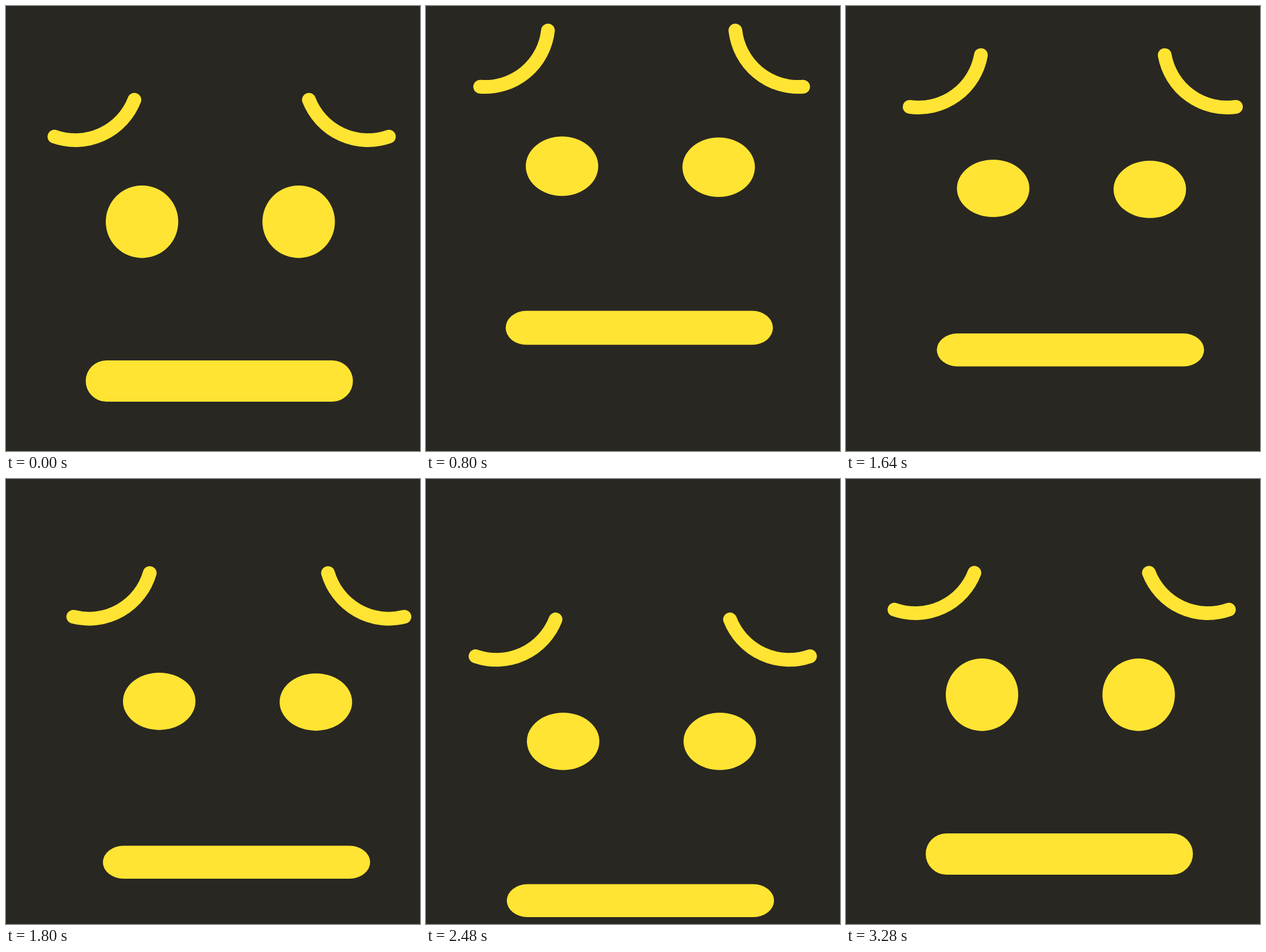
An HTML page with a canvas that plays this animation: 722x776 px, repeating every 3720 ms.

```html
<!DOCTYPE html>
<html lang="en">
<head>
<meta charset="utf-8">
<title>Worried face</title>
<style>
  html, body { margin: 0; width: 100%; height: 100%; overflow: hidden; background: #292722; }
  canvas { display: block; }
</style>
</head>
<body>
<canvas id="stage" width="722" height="776"></canvas>
<script>
const W = 722, H = 776, LOOP = 3720, STEP = 40;
const INK = '#ffe433', PAPER = '#292722';
const ctx = document.getElementById('stage').getContext('2d');

const clamp = v => Math.min(1, Math.max(0, v));
const mix = (a, b, p) => a + (b - a) * p;
const smooth = u => u * u * (3 - 2 * u);
const span = (t, from, to) => clamp((t - from) / (to - from));

// Slow start, flat end; a smaller "tail" settles for longer.
function glide(u, tail) {
  if (u <= 0 || u >= 1) return clamp(u);
  let lo = 0, hi = 1;
  for (let i = 0; i < 30; i++) {
    const s = (lo + hi) / 2, r = 1 - s;
    const x = s * r * r + 3 * tail * s * s * r + s * s * s;
    if (x < u) lo = s; else hi = s;
  }
  return smooth(lo);
}

// Sideways head shake: [time, offset]
const SHAKE = [[1400, 0], [1800, 30], [2080, -32.5], [2360, 5.5], [2560, 0]];

function shakeAt(t) {
  for (let i = 1; i < SHAKE.length; i++) {
    const [t0, x0] = SHAKE[i - 1], [t1, x1] = SHAKE[i];
    if (t >= t0 && t < t1) return mix(x0, x1, smooth(span(t, t0, t1)));
  }
  return 0;
}

function poseAt(t) {
  const up = glide(span(t, 120, 1275), 0.175);
  const down = glide(span(t, 1400, 2448), 0.175);
  const level = glide(span(t, 1400, 2350), 0.175);
  const settle = smooth(span(t, 1400, 2360));
  const back = glide(span(t, 2640, 3280), 0.333);
  return {
    x: shakeAt(t),
    y: mix(mix(-108 * up, 81.3, down), 0, back),
    tilt: up * (1 - level),
    spread: up * (1 - settle),
    squash: Math.pow(up, 1.15) * (1 - back)
  };
}

function brow(x, y, tilt, side) {
  const R = 110.5, depth = 79.5, half = 0.768;
  ctx.save();
  ctx.translate(x, y);
  ctx.scale(side, 1);
  ctx.rotate(-(24.7 + 17 * tilt) * Math.PI / 180);
  ctx.beginPath();
  ctx.arc(0, -depth, R, Math.PI / 2 - half, Math.PI / 2 + half);
  ctx.stroke();
  ctx.restore();
}

function eye(x, y, ry) {
  ctx.beginPath();
  ctx.ellipse(x, y, 63.2, ry, 0, 0, Math.PI * 2);
  ctx.fill();
}

function mouth(x, y, ry) {
  const reach = 197, rx = 36;
  ctx.beginPath();
  ctx.ellipse(x + reach, y, rx, ry, 0, -Math.PI / 2, Math.PI / 2);
  ctx.ellipse(x - reach, y, rx, ry, 0, Math.PI / 2, Math.PI * 1.5);
  ctx.closePath();
  ctx.fill();
}

function draw(t) {
  const { x, y, tilt, spread, squash } = poseAt(t);
  ctx.fillStyle = PAPER;
  ctx.fillRect(0, 0, W, H);
  ctx.fillStyle = ctx.strokeStyle = INK;
  ctx.lineWidth = 24;
  ctx.lineCap = 'round';

  const browY = 195.7 + y - 10 * spread;
  brow(154.2 + x - 0.7 * tilt, browY, tilt, 1);
  brow(598 + x + 0.7 * tilt, browY, tilt, -1);

  const eyeR = mix(63.2, 50, squash);
  eye(237.2 + x, 376.2 + y - 2 * spread, eyeR);
  eye(510.4 + x, 376.2 + y, eyeR);

  mouth(372 + x, 653.9 + y + 2.7 * spread, mix(36, 28.7, squash));
}

const start = performance.now();
function tick(now) {
  const t = Math.max(0, now - start) % LOOP;
  draw(Math.floor(t / STEP) * STEP);
  requestAnimationFrame(tick);
}
draw(0);
requestAnimationFrame(tick);
</script>
</body>
</html>
```
